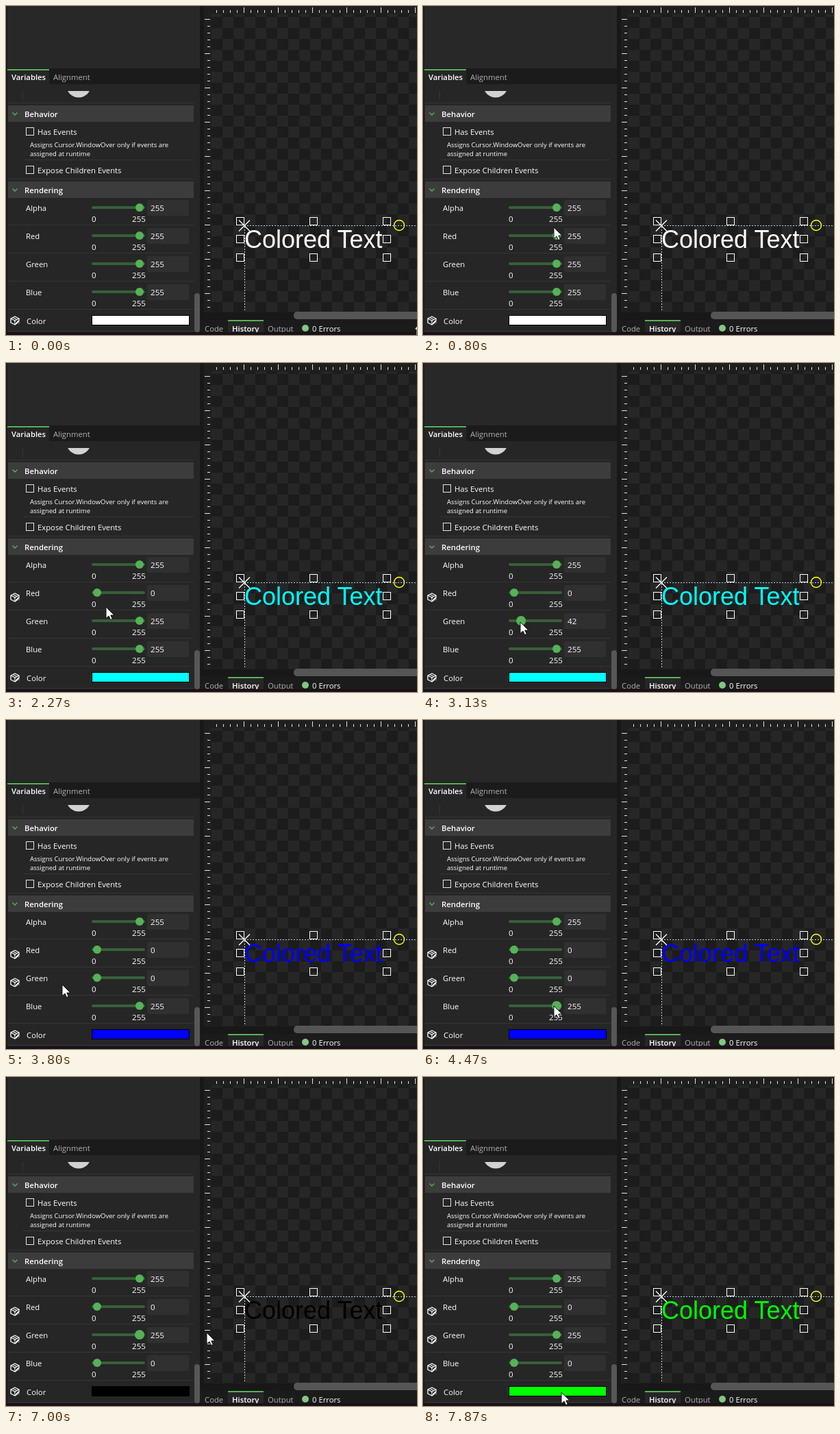
Animation, 600 px wide and 480 px high, one loop 8000 ms. Source, as an HTML page:

```html
<!DOCTYPE html>
<html lang="en">
<head>
<meta charset="utf-8">
<title>Colour sliders</title>
<style>
html, body { margin: 0; width: 100%; height: 100%; overflow: hidden; background: #1a1a1a; }
svg { display: block; width: 600px; height: 480px; }
text { font: 11.3px "Open Sans", "Noto Sans", sans-serif; fill: #fff; white-space: pre; }
.bold { font-weight: 600; }
.dim { fill: #b0b0b0; }
.hint { font-size: 9.5px; }
.num { font-size: 11.6px; }
.big { font: 36px "Liberation Sans", Arial, sans-serif; }
.end { text-anchor: end; }
</style>
</head>
<body>
<svg id="stage" viewBox="0 0 600 480">
  <defs>
    <pattern id="checks" x="300" y="0" width="32" height="32" patternUnits="userSpaceOnUse">
      <path fill="#1c1c1c" d="M0 0h32v32h-32z"/>
      <path fill="#262626" d="M0 0h16v16h-16zM16 16h16v16h-16z"/>
    </pattern>
    <clipPath id="list"><path d="M0 124h283v352h-283z"/></clipPath>
    <g id="cube" fill="none" stroke="#fff" stroke-width="1.3" stroke-linejoin="round">
      <path d="M-6 -3L0 -6L6 -3V3L0 6L-6 3ZM-6 -3L0 0L6 -3M0 0V6M-3 -4.5L3 -1.5"/>
      <path d="M1 5L6 0" stroke="#262626" stroke-width="4"/>
      <path d="M1 5L6 0" stroke-width="2.2"/>
    </g>
  </defs>
</svg>
<script>
const NS = "http://www.w3.org/2000/svg";
const stage = document.getElementById("stage");
const GREEN = "#55b257";
const ROW = 41;

function add(tag, attrs, content) {
  const el = document.createElementNS(NS, tag);
  for (const name in attrs) el.setAttribute(name, attrs[name]);
  if (content !== undefined) el.textContent = content;
  stage.appendChild(el);
  return el;
}
const rect = (x, y, width, height, fill, rx = 0) => add("rect", { x, y, width, height, fill, rx });
const text = (x, y, str, cls = "") => add("text", { x, y, class: cls }, str);
const path = (d, stroke, width = 1, more = {}) =>
  add("path", { d, stroke, "stroke-width": width, fill: "none", ...more });
const square = (x, y, stroke) =>
  add("rect", { x: x - 5.5, y: y - 5.5, width: 11, height: 11, fill: "none", stroke });
const cube = y => add("use", { href: "#cube", x: 13, y });

function drawCanvas() {
  rect(283, 0, 317, 480, "#181818");
  rect(289, 0, 311, 447, "#1f1f1f");
  rect(300, 12, 300, 434, "url(#checks)");
  let ticks = "";
  for (let x = 308; x < 600; x += 10) ticks += `M${x - .5} 10V${(x - 348) % 50 ? 6 : 2}`;
  for (let y = 20; y < 446; y += 10) ticks += `M298 ${y - .5}H${(y - 320) % 50 ? 294 : 290}`;
  path(ticks, "#e4e4e4");
  rect(420, 446, 190, 11, "#555", 5);
}

function drawCheckbox(y, name) {
  square(35, y, "#e4e4e4");
  text(46, y + 5, name);
}

function drawHeader(y, name) {
  rect(3, y, 271, 24, "#3c3c3c");
  path(`M9.5 ${y + 10.5}l3.5 3.5l3.5 -3.5`, GREEN, 1.4);
  text(27, y + 17, name, "bold");
}

function drawPanel() {
  rect(0, 0, 283, 480, "#1b1b1b");
  rect(2, 0, 281, 91, "#282828");
  rect(2, 114, 281, 362, "#262626");
  rect(2, 92, 61, 23, "#262626");
  rect(2, 92, 61, 2, GREEN);
  text(8, 108, "Variables", "bold");
  text(69, 108, "Alignment", "dim");
  add("circle", { cx: 106, cy: 115.5, r: 18, fill: "#d2d2d2", "clip-path": "url(#list)" });
  path("M24.5 124V138M3 141.5H274M24 224.5H274M3 252.5H274M3 474.5H274", "#353535");
  drawHeader(145, "Behavior");
  drawHeader(256, "Rendering");
  drawCheckbox(183, "Has Events");
  text(35, 206, "Assigns Cursor.WindowOver only if events are", "hint");
  text(35, 219, "assigned at runtime", "hint");
  drawCheckbox(239, "Expose Children Events");
  rect(275, 419, 8, 57, "#575757", 4);
  cube(459);
  text(30, 464, "Color");
}

function drawSlider(name, i) {
  const y = 294 + ROW * i;
  text(29, y + 5, name);
  rect(125, y - 2, 78, 4, "#38603a", 2);
  text(125, y + 21, "0", "num");
  text(204, y + 21, "255", "num end");
  rect(206, y - 11, 61, 23, "#303030", 2);
  path(`M3 ${y + 25.5}H274`, "#353535");
  return {
    y,
    knob: add("circle", { cy: y, fill: GREEN }),
    value: text(211, y + 5, "", "num"),
    icon: name === "Alpha" ? null : cube(y + 7)
  };
}

function drawSelection() {
  const dash = { "stroke-dasharray": "2 2" };
  path("M348 320.5H600", "#add8e6", 1, dash);
  path("M348.5 322V445", "#add8e6", 1, dash);
  const label = text(348, 353, "Colored Text", "big");
  for (const x of [342, 449, 556])
    for (const y of [314, 340, 367])
      if (x !== 449 || y !== 340) square(x, y, "#fff");
  path("M340 312.5l16 16M356 312.5l-16 16", "#fff", 1.3);
  add("circle", { cx: 574, cy: 320, r: 7.5, fill: "none", stroke: "#ff0", "stroke-width": 1.4 });
  return label;
}

function drawFooter() {
  rect(283, 458, 317, 18, "#1b1b1b");
  rect(324, 458, 52, 18, "#262626");
  rect(324, 458, 52, 2, GREEN);
  text(290, 475, "Code", "dim");
  text(330, 475, "History", "bold");
  text(382, 475, "Output", "dim");
  add("circle", { cx: 437, cy: 470, r: 5, fill: "#82c784" });
  text(447, 475, "0 Errors");
  rect(0, 476, 600, 4, "#17121a");
}

drawCanvas();
drawPanel();
const sliders = ["Alpha", "Red", "Green", "Blue"].map(drawSlider);
const [, red, green, blue] = sliders;
const swatch = add("rect", { x: 125.5, y: 451.5, width: 142, height: 14, stroke: "#000" });
const label = drawSelection();
drawFooter();

const ARROW = "M0 0V16.5L4 13L6.6 18.6L9.3 17.4L6.8 12H12Z";
const RESIZE = "M0 -10L-4 -5H-1V5H-4L0 10L4 5H1V-5H4Z";
const cursor = add("path", { fill: "#fff", stroke: "#111", "stroke-linejoin": "round" });

// Pointer moves, 15 ticks per second; it rests in between
const TICK = 1000 / 15;
const home = [600, 477];
const moves = [
  { from: 0, to: 9, at: [205, 306] },
  { from: 9, to: 11, at: [189, 318] },
  { from: 11, to: 14, at: [195, 337] },
  { from: 21, to: 26, at: [111, 342] },
  { from: 30, to: 39, at: [195, 377] },
  { from: 46, to: 47, at: [142, 378] },
  { from: 47, to: 49, at: [66, 381] },
  { from: 54, to: 67, at: [191, 417] },
  { from: 67, to: 70, at: [194, 419] },
  { from: 76, to: 80, at: [81, 419] },
  { from: 83, to: 84, at: [109, 391] },
  { from: 84, to: 89, at: [137, 369] },
  { from: 98, to: 105, at: [293, 373] },
  { from: 106, to: 111, at: [216, 453] },
  { from: 111, to: 118, at: [202, 460] }
];
const drags = [
  { slider: red, from: 22, to: 27 },
  { slider: green, from: 47, to: 51 },
  { slider: blue, from: 77, to: 81 },
  { slider: green, from: 99, to: 106 }
];

const clamp = f => Math.min(1, Math.max(0, f));
const ease = f => (1 - Math.cos(Math.PI * f)) / 2;
const toValue = x => Math.round(255 * clamp((x - 131.8) / 62));

function pointer(tick) {
  let [x, y] = home;
  for (const { from, to, at } of moves) {
    const f = ease(clamp((tick - from) / (to - from)));
    x += (at[0] - x) * f;
    y += (at[1] - y) * f;
  }
  return [x, y];
}

function render(ms) {
  const tick = Math.floor((ms % 8000 + 4) / TICK);
  const [x, y] = pointer(tick);
  for (const s of sliders) Object.assign(s, { now: 255, saved: 255, held: false, changed: false });
  for (const { slider: s, from, to } of drags) {
    if (tick < from) continue;
    s.now = toValue(pointer(Math.min(tick, to - 1))[0]);
    s.held = tick < to;
    if (!s.held) {
      s.saved = s.now;
      s.changed = true;
    }
  }
  for (const s of sliders) {
    const cx = 133 + s.now / 255 * 62;
    const hover = Math.hypot(x - cx, y - s.y) < 9;
    s.knob.setAttribute("cx", cx);
    s.knob.setAttribute("r", s.held || hover ? 7 : 6);
    s.value.textContent = s.now;
    if (s.icon) s.icon.style.display = s.changed ? "" : "none";
  }
  label.style.fill = swatch.style.fill = `rgb(${red.saved},${green.saved},${blue.saved})`;
  cursor.setAttribute("d", x > 595 ? RESIZE : ARROW);
  cursor.setAttribute("transform", `translate(${Math.round(x)} ${Math.round(y)})`);
}

const start = performance.now();
function loop() {
  render(performance.now() - start);
  requestAnimationFrame(loop);
}
loop();
</script>
</body>
</html>
```
